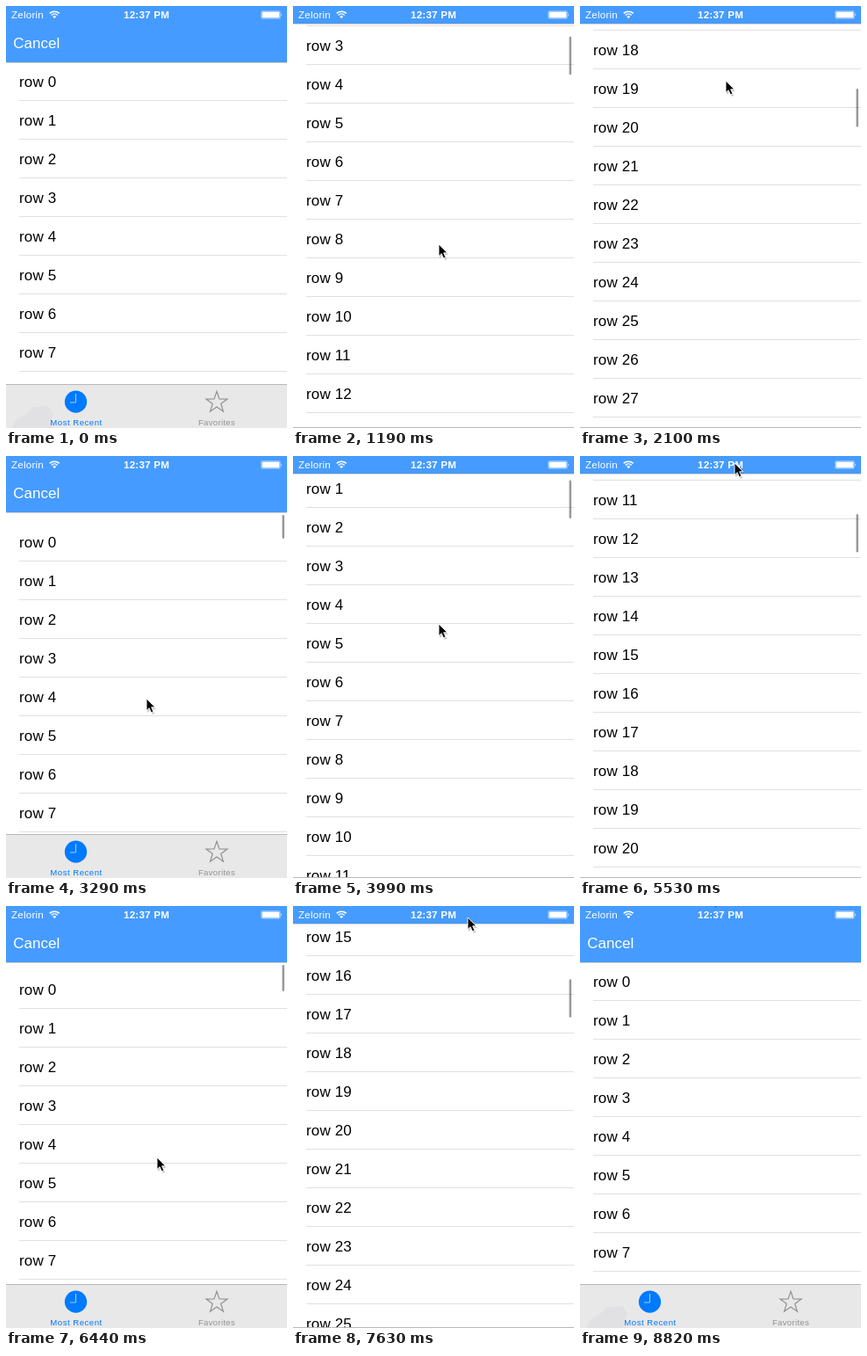
Recreate the animation shown at these times as an HTML page. Size 320 px wide and 480 px high, loop 9.03 s.

```html
<!DOCTYPE html>
<html lang="en">
<head>
<meta charset="utf-8">
<title>Scrolling list with hiding bars</title>
<style>
html, body { margin: 0; width: 100%; height: 100%; overflow: hidden; background: #fff; }
svg { display: block; width: 320px; height: 480px; font-family: "Liberation Sans", Arial, sans-serif; }
#rows text { font-size: 17px; letter-spacing: .15px; }
#rows path { stroke: #e0e0e1; }
#status { fill: #fff; font-size: 11.6px; letter-spacing: .22px; }
#cancel { fill: #fff; font-size: 17px; }
#tabs text { font-size: 9.6px; text-anchor: middle; }
</style>
</head>
<body>
<svg viewBox="0 0 320 480">
  <rect width="320" height="480" fill="#fff"/>
  <g id="rows"></g>
  <rect id="thumb" x="314.5" width="2.5" rx="1.25"/>

  <g id="nav">
    <rect y="-44" width="320" height="108" fill="#459bff"/>
    <path d="M0 64.5H320" stroke="#000" opacity=".18"/>
    <text id="cancel" x="8.3" y="48">Cancel</text>
  </g>
  <g id="status">
    <text x="6" y="14.4">Zelorin</text>
    <path d="M49.7 8.4a7.8 7.8 0 0 1 11 0M51.7 10.5a5 5 0 0 1 7 0" fill="none" stroke="#fff" stroke-width="1.5"/>
    <path d="M55.2 14.2l-2-2.2a2.9 2.9 0 0 1 4 0z"/>
    <text x="160" y="14.4" text-anchor="middle" font-weight="bold">12:37 PM</text>
    <rect x="290.5" y="5.5" width="22" height="9" rx="1.5" fill="none" stroke="#fff" stroke-opacity=".4" stroke-width=".8"/>
    <rect x="291.5" y="6.5" width="20" height="7" rx=".6"/>
    <path d="M313.3 8.2q1.5 1.8 0 3.6z"/>
  </g>

  <g id="tabs">
    <rect y="430" width="320" height="50" fill="#e8e8e8"/>
    <path id="haze" d="M7 480L12 470L22 465L31 456L48 455L54 464L51 473L55 480z" fill="#e1e1e3"/>
    <path d="M0 430.5H320" stroke="#b9b9b9"/>
    <circle cx="79.5" cy="450.2" r="12.6" fill="#007aff"/>
    <path d="M79.5 441V451H73" fill="none" stroke="#b5d7fc" stroke-width=".9"/>
    <text x="80" y="476.6" fill="#007aff" letter-spacing=".5">Most Recent</text>
    <path id="star" fill="none" stroke="#929292" stroke-width="1.2"/>
    <text x="240" y="476.6" fill="#929292" letter-spacing=".3">Favorites</text>
  </g>

  <g id="cursor">
    <path d="M1 2V16L4.3 13L6.8 18L9.3 17L7 12H11z" opacity=".2"/>
    <path d="M0 0V13.5L3.1 10.7L5.3 15.8L7.8 14.7L5.6 9.8H9.8z" stroke="#fff" stroke-width=".9"/>
  </g>
</svg>
<script>
const LOOP = 9030, STEP = 70, ROW = 44, BOUNCE = 175;

// Each trip scrolls away from the top (down..top) and back (up..rest),
// while the pointer goes to `high` and then to `low`.
const trips = [
  { down: 840, top: 2030, up: 2100, rest: 3148, peak: 828, high: [166, 85], low: [160, 276] },
  { down: 3640, top: 4270, up: 4410, rest: 4537, peak: 160, high: [170, 130], low: [171, 279] },
  { down: 4970, top: 5530, up: 5670, rest: 6290, peak: 520, high: [176, 8], low: [172, 286] },
  { down: 6580, top: 7490, up: 7700, rest: 8120, peak: 711, high: [199, 13], low: [180, 6], tapped: true }
];
const first = trips[0], last = trips[trips.length - 1];
const home = [166, 320];

const $ = id => document.getElementById(id);
const set = (id, attrs) => {
  for (const k in attrs) $(id).setAttribute(k, attrs[k]);
};
const move = (id, x, y) => set(id, { transform: `translate(${Math.round(x)} ${Math.round(y)})` });
const mix = (a, b, p) => a + (b - a) * p;
const ramp = (t, a, b) => {
  const p = Math.min(1, Math.max(0, (t - a) / (b - a)));
  return p * p * (3 - 2 * p);
};

let rows = "";
for (let i = 0; i < 32; i++) {
  const y = 64 + i * ROW;
  rows += `<text x="15" y="${y + 28}">row ${i}</text><path d="M15 ${y + 43.5}H320"/>`;
}
$("rows").innerHTML = rows;

let star = "";
for (let i = 0; i < 10; i++) {
  const r = i % 2 ? 5 : 12.7, a = i * Math.PI / 5;
  star += `${i ? "L" : "M"}${240 + r * Math.sin(a)} ${451 - r * Math.cos(a)}`;
}
set("star", { d: star + "z" });

function draw(t) {
  const n = Math.max(0, trips.findLastIndex(k => t >= k.down));
  const trip = trips[n], from = n ? trips[n - 1].low : home;
  const away = ramp(t, trip.down, trip.top), back = ramp(t, trip.up, trip.rest);

  const q = (t - trip.rest) / BOUNCE;
  const bounce = !trip.tapped && q > 0 && q < 1 ? 40 * Math.sin(Math.PI * Math.sqrt(q)) : 0;
  const s = Math.round(trip.peak * (away - back) - bounce);
  const h = ramp(t, trip.down + 70, trip.down + 280) - ramp(t, trip.up, trip.up + 210);

  move("rows", 0, -s);
  move("nav", 0, -44 * h);
  move("tabs", 0, 49 * h);
  set("cancel", { opacity: 1 - h });
  set("haze", { opacity: t <= first.down || t >= last.rest ? 1 : 0 });
  set("thumb", {
    y: mix(67 + Math.max(s, 0) * .081, 23 + (s - 44) * .0905, h),
    height: Math.max(3, mix(39, 43.5, h) + Math.min(s, 0)),
    opacity: .4 * (ramp(t, first.down, 980) - ramp(t, 8190, 8540))
  });

  const [x, y] = from.map((v, i) => mix(mix(v, trip.high[i], away), trip.low[i], back));
  const enter = 1 - ramp(t, 140, 560), leave = ramp(t, 8190, 8820);
  move("cursor", x + 20 * enter - 33 * leave, y + 180 * enter - 22 * leave);
}

const start = performance.now();
function tick() {
  const t = (performance.now() - start) % LOOP;
  draw(Math.floor(t / STEP) * STEP);
  requestAnimationFrame(tick);
}
tick();
</script>
</body>
</html>
```
